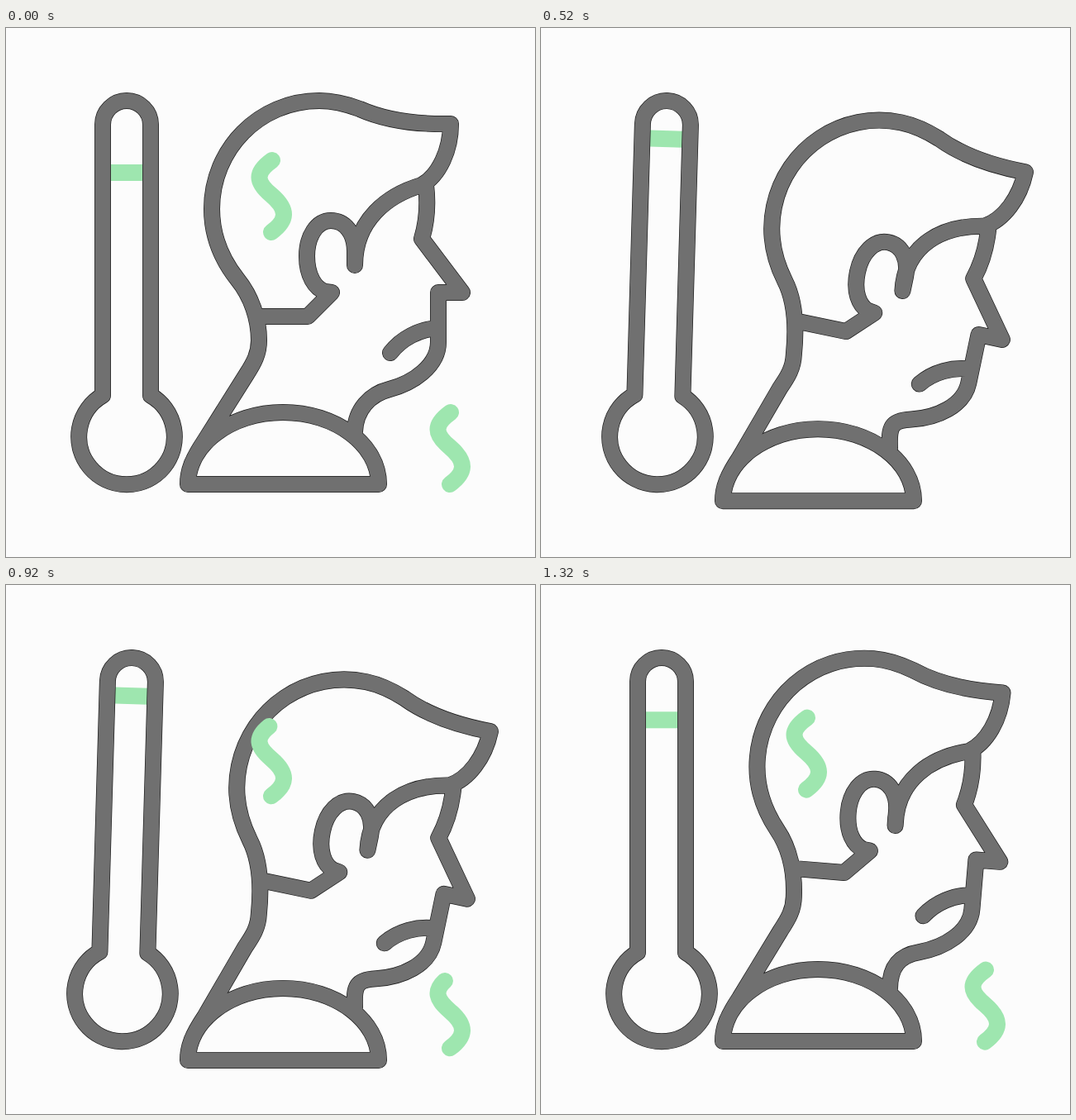
Animation of 640 by 640 pixels, one loop 1.34 s. Source, as an HTML page:

```html
<!DOCTYPE html>
<html lang="en">
<head>
<meta charset="utf-8">
<title>Fever</title>
<style>
  html, body { margin: 0; height: 100%; overflow: hidden; background: #fcfcfc; }
  svg { display: block; width: 100vw; height: 100vh; }
  path { fill: none; stroke-linecap: round; stroke-linejoin: round; }
  .edge { stroke: #1c1c1c; stroke-width: 20; }
  .line { stroke: #707070; stroke-width: 18.6; }
  .sweat { stroke: #9ee6af; stroke-width: 20; }
  .bar { fill: #9ee6af; }
</style>
</head>
<body>
<svg viewBox="0 0 640 640">
  <g id="thermo">
    <rect id="bar" class="bar" x="126" y="165" width="40" height="20"/>
    <path class="edge"/>
    <path class="line"/>
  </g>
  <g id="man">
    <path class="edge"/>
    <path class="line"/>
  </g>
  <path class="sweat"/>
  <path class="sweat"/>
</svg>
<script>
const LOOP = 1340, STEP = 40;
const PIVOT = { x: 377, y: 367 };
const TUBE = 'M117 444.5V117A29 29 0 0 1 175 117V444.5A57.8 57.8 0 1 1 117 444.5Z';
const DROP = 'M322 160C301 175 302 186 321 202C342 220 340 233 321 247';

// Points are x,y[,weight]: 1 follows the head, 0 stays with the shoulders.
const MAN = `
  M538,116 C490,117 455,110 428,98 C412,92 396,88 379,88
  C306,88 249,147 249,219 C249,252 261,280 280,304
  C297,325 306,352,.7 306,378,.2 C306,394,.2 300,405,.2 291,419,.2
  L240,500,0 C226,521,0 220,535,0 220,552,0
  M220,552,0 C220,504,0 272,465,0 335,465,0
  C399,465,0 451,504,0 451,552,0 Z
  M538,116 C538,148 524,178 503,190 C462,202,.8 422,232,.7 422,287
  L422,270 C422,248 410,233 393,233 C376,233 364,252 364,276
  C364,300 374,315 386,319 L394,320 L365,349 L306,349
  M508,190 C511,215 509,235 503,255 L552,320 L523,320 L523,380
  C523,408 494,429 464,437 C440,443 423,462,.1 422,488,0
  M465,393 C478,376 500,364 523,363`;

const pick = s => [...document.querySelectorAll(s)];
const thermo = document.getElementById('thermo');
const man = document.getElementById('man');
const bar = document.getElementById('bar');
const manLines = pick('#man path');
const drops = pick('.sweat');

pick('#thermo path').forEach(p => p.setAttribute('d', TUBE));
drops.forEach(p => { p.setAttribute('d', DROP); p.setAttribute('pathLength', 1); });

const part = (t, a, b) => Math.min(1, Math.max(0, (t - a) / (b - a)));
const ease = (t, a, b) => (1 - Math.cos(Math.PI * part(t, a, b))) / 2;
const easeOut = (t, a, b, n) => 1 - (1 - part(t, a, b)) ** n;
const easeIn = (t, a, b, n) => part(t, a, b) ** n;

function tilted(deg) {
  const r = deg * Math.PI / 180, s = Math.sin(r), c = Math.cos(r) - 1;
  return MAN.replace(/(\d+),(\d+)(?:,([\d.]+))?/g, (_, px, py, w = 1) => {
    const x = px - PIVOT.x, y = py - PIVOT.y;
    const nx = +px + w * (c * x - s * y), ny = +py + w * (s * x + c * y);
    return nx.toFixed(2) + ' ' + ny.toFixed(2);
  });
}

// Swings around 2 degrees, eased in and out from rest.
function wobble(t) {
  if (t <= 320 || t >= 1320) return 0;
  if (t < 425) return -2.3 * ease(t, 320, 425);
  if (t > 1225) return -2.3 * (1 - ease(t, 1225, 1320));
  return 2 + 4.3 * Math.cos((t - 625) / 200 * Math.PI);
}

function drawDrop(el, x, y, from, to) {
  const shown = to - from > 0.001;
  el.style.display = shown ? '' : 'none';
  el.setAttribute('transform', `translate(${x} ${y})`);
  el.setAttribute('stroke-dasharray', to - from > 0.999 ? 'none' : `${to - from} 2`);
  el.setAttribute('stroke-dashoffset', -from);
}

function draw(t) {
  const rise = ease(t, 181, 493) - ease(t, 1120, 1432);
  bar.setAttribute('y', 165 - 41 * rise);
  thermo.setAttribute('transform', `rotate(${wobble(t)} 146 320)`);

  const sink = 25.3 * (ease(t, 120, 690) - ease(t, 825, 1302));
  const tilt = 11.8 * (ease(t, 0, 440) - ease(t, 1077, 1512));
  const d = tilted(tilt);
  manLines.forEach(p => p.setAttribute('d', d));
  man.setAttribute('transform', `translate(0 ${sink})`);

  const leaving = t < 540;
  const lift = leaving ? -25 * ease(t, 0, 520) : 19 * (1 - easeOut(t, 580, 1420, 1.6));
  if (leaving) {
    drawDrop(drops[0], 0, lift, 0, 1 - ease(t, 120, 520));
    drawDrop(drops[1], 216, 305 + lift, 0, 1 - ease(t, 160, 520));
  } else {
    drawDrop(drops[0], 0, lift, 1 - easeOut(t, 590, 950, 1.3), 1);
    drawDrop(drops[1], 216, 305 + lift, 1 - easeOut(t, 640, 960, 1.2), 1);
  }
}

const start = performance.now();
function tick() {
  const t = (performance.now() - start) % LOOP;
  draw(Math.floor(t / STEP) * STEP);
  requestAnimationFrame(tick);
}
tick();
</script>
</body>
</html>
```
